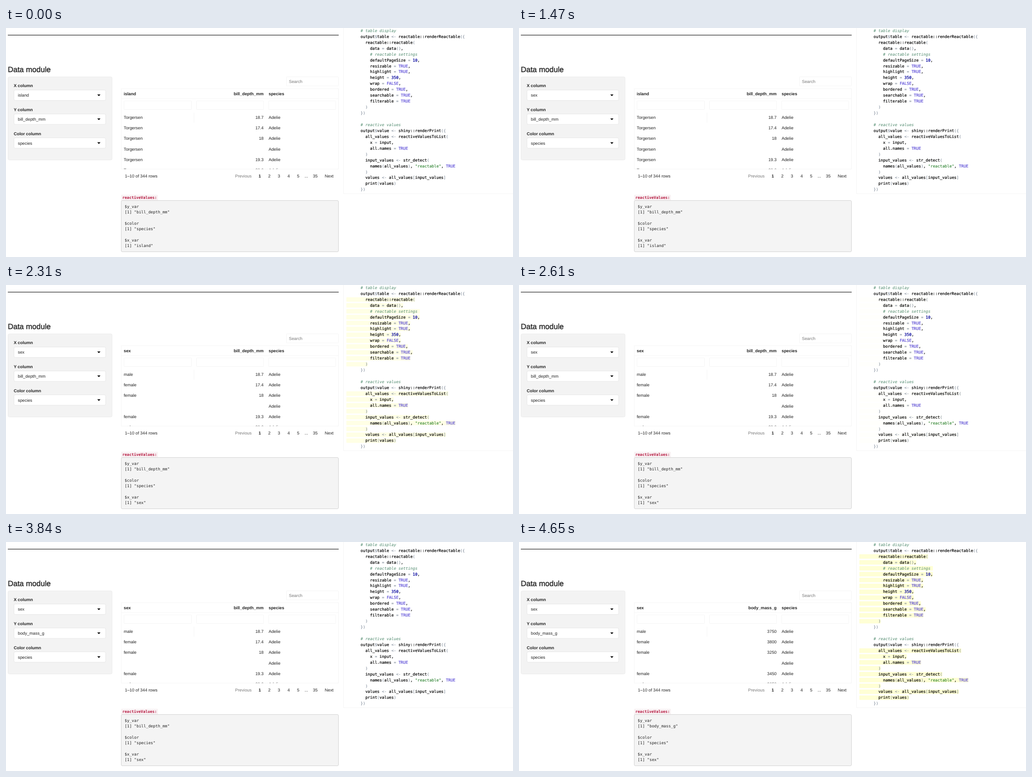
These frames come from a looping animation (1111x504 px, 4.68 s). An HTML page:

```html
<!DOCTYPE html>
<html lang="en">
<head>
<meta charset="utf-8">
<title>Data module</title>
<style>
  html, body { margin: 0; width: 100%; height: 100%; overflow: hidden; background: #fff; }
  svg { display: block; width: 1111px; height: 504px; }
  text {
    font-family: "Liberation Sans", Arial, sans-serif; font-size: 9.3px;
    fill: #222; white-space: pre; text-rendering: geometricPrecision;
  }
  .b { font-weight: bold; }
  .end { text-anchor: end; }
  .mid { text-anchor: middle; }
  .muted { fill: #777; }
  .title { font-size: 16.6px; fill: #2b2b2b; stroke: #2b2b2b; stroke-width: .5px; }
  .mono { font-family: "DejaVu Sans Mono", Menlo, monospace; font-size: 8.64px; }
  .code { fill: #000; stroke: #000; stroke-width: .22px; }
  .tag { font-size: 8.4px; font-weight: bold; fill: #b5183f; }
  .comment { fill: #4c886b; stroke: none; font-style: italic; }
  .string { fill: #036a07; stroke: none; }
  .literal { fill: #5848d6; stroke: #5848d6; }
  .number { fill: #1a1aa6; stroke: #1a1aa6; stroke-width: .4px; }
  .op { fill: #687687; stroke: none; }
  .well { fill: #f3f3f3; stroke: #ececec; }
  .pre { fill: #f4f4f4; stroke: #d2d2d2; }
  .line { fill: none; stroke: #f5f5f5; }
  .box { fill: #fff; stroke: #e6e6e6; }
  .open .box { stroke: #66afe9; filter: drop-shadow(0 0 2px rgba(102, 175, 233, .6)); }
  .menu { visibility: hidden; }
  .open .menu { visibility: visible; }
  .panel { fill: #fff; stroke: #d0d0d0; filter: drop-shadow(0 4px 4px rgba(0, 0, 0, .175)); }
  .bar { fill: #337ab7; }
  .menu .on { fill: #fff; }
  #glow { fill: #ff9; }
</style>
</head>
<body>
<svg id="stage" viewBox="0 0 1111 504"></svg>
<script>
const LOOP = 4680;
const COLUMNS = ["species", "island", "bill_length_mm", "bill_depth_mm",
                 "flipper_length_mm", "body_mass_g", "sex", "year"];
const DATA = {
  island: Array(6).fill("Torgersen"),
  sex: ["male", "female", "female", "", "female", "male"],
  bill_depth_mm: ["18.7", "17.4", "18", "", "19.3", "20.6"],
  body_mass_g: ["3750", "3800", "3250", "", "3450", "3650"],
  species: Array(6).fill("Adelie")
};
const CODE = `# table display
output$table <- reactable::renderReactable({
  reactable::reactable(
    data = data(),
    # reactable settings 
    defaultPageSize = 10,
    resizable = TRUE,
    highlight = TRUE,
    height = 350,
    wrap = FALSE,
    bordered = TRUE,
    searchable = TRUE,
    filterable = TRUE
  )
})

# reactive values
output$value <- shiny::renderPrint({
  all_values <- reactiveValuesToList(
    x = input,
    all.names = TRUE
  )
  input_values <- str_detect(
    names(all_values), "reactable", TRUE
  )
  values <- all_values[input_values]
  print(values)
})`.split("\n");

// Each pick: menu opens, pointer enters rows, value is taken, outputs refresh and glow.
const PICKS = [
  { menu: "x", from: "island", to: "sex", open: 60, close: 1170, update: 1500, fade: 1220,
    hover: [420, 480, 540, 600, 660, 810, 900] },
  { menu: "y", from: "bill_depth_mm", to: "body_mass_g", open: 2910, close: 3600, update: 3870, fade: 1400,
    hover: [3030, 3120, 3210, 3300, 3390, 3480] }
];

const CHAR = 5.2, LINE = 12.945, ROW = 23.27, OPTION = 17.3;
const $ = id => document.getElementById(id);
const esc = s => s.replace(/&/g, "&amp;").replace(/</g, "&lt;");
const rect = (x, y, w, h, cls, r = 0) =>
  `<rect x="${x}" y="${y}" width="${w}" height="${h}" rx="${r}" class="${cls}"/>`;
// y is the middle of the capitals
const raw = (x, y, html, cls = "", id = "", size = 9.3) =>
  `<text x="${x}" y="${y + size * .355}" class="${cls}"${id && ` id="${id}"`}>${html}</text>`;
const label = (x, y, s, cls, id, size) => raw(x, y, esc(s), cls, id, size);
const mono = (x, y, s, id) => label(x, y, s, "mono", id, 8.64);

function paint(line) {
  const kinds = ["comment", "string", "literal", "number", "op"];
  const token = /(#.*)|("[^"]*")|(\b(?:TRUE|FALSE)\b)|(\b\d+\b)|(<-|[=$(){}[\]])/g;
  let out = "", at = 0;
  for (const m of line.matchAll(token)) {
    const kind = kinds[m.slice(1).findIndex(Boolean)];
    out += esc(line.slice(at, m.index)) + `<tspan class="${kind}">${esc(m[0])}</tspan>`;
    at = m.index + m[0].length;
  }
  return out + esc(line.slice(at));
}

function codePanel() {
  let glow = "", text = "";
  CODE.forEach((line, i) => {
    const y = 5.8 + i * LINE;
    const indent = line.search(/\S|$/);
    if (indent) glow += rect(745.8, y - 4.7, (6 + line.length) * CHAR, 9.8, "", 1);
    text += raw(777 + indent * CHAR, y, paint(line.trimStart()), "mono code", "", 8.64);
  });
  return `<path class="line" d="M739.5 0V364.5H1111"/><g id="glow">${glow}</g>${text}`;
}

function select(id, y, title, value) {
  return label(17, y - 21, title, "b") + `<g id="${id}">` +
    rect(17.5, y - 11.5, 201, 23, "box", 3) +
    label(26, y, value, "", id + "Value") +
    `<path id="${id}Caret" d="M200 ${y - 1.8}h7l-3.5 3.8z"/></g>`;
}

function menu(id, y) {
  const top = y + 12;
  const rows = COLUMNS.map((c, i) => label(26, top + 3.3 + OPTION * (i + .5), c)).join("");
  return `<clipPath id="${id}Clip">${rect(18, top, 200, 133, "")}</clipPath>
    <g class="menu">${rect(17.5, top, 201, 134, "panel", 2)}
    <g clip-path="url(#${id}Clip)">${rect(18, top + 3.3, 200, OPTION, "bar")}${rows}</g></g>`;
}

function table() {
  let s = rect(614.5, 107.5, 114, 20, "line", 1) + label(620, 117.7, "Search", "muted") +
    rect(252.5, 133.5, 476, 177, "line") +
    `<path class="line" d="M253 155.5H728M412 186V208"/>` +
    rect(258.5, 160.5, 148, 19, "line", 1) + rect(417.5, 160.5, 147, 19, "line", 1) +
    rect(575.5, 160.5, 147, 19, "line", 1) +
    label(258, 145, "", "b", "headX") + label(564.5, 145, "", "b end", "headY") +
    label(575.5, 145, "species", "b") +
    `<clipPath id="body">${rect(252, 156, 477, 154.6, "")}</clipPath><g clip-path="url(#body)">`;
  DATA.species.forEach((name, i) => {
    const y = 196.6 + i * ROW;
    s += label(258, y, "", "", "cellX" + i) + label(564.5, y, "", "end", "cellY" + i) +
      label(575.5, y, name);
  });
  s += "</g>" + label(260.5, 325.3, "1–10 of 344 rows") + label(502, 325.3, "Previous", "muted");
  ["1", "2", "3", "4", "5"].forEach((n, i) => {
    s += label(556 + i * 21.1, 325.3, n, i ? "mid" : "mid b");
  });
  return s + label(658, 325.3, "...", "mid") + label(677.7, 325.3, "35", "mid") +
    label(698.5, 325.3, "Next");
}

function output() {
  return rect(252, 367, 81, 13, "", 2).replace("/>", ' fill="#f9f2f4"/>') +
    label(255, 373.5, "reactiveValues:", "mono tag", "", 8.4) +
    rect(252.5, 379.7, 476, 112.8, "pre", 2.5) +
    mono(260, 393, "$y_var") + mono(260, 405.3, "", "printY") +
    mono(260, 429.8, "$color") + mono(260, 442, '[1] "species"') +
    mono(260, 466.6, "$x_var") + mono(260, 479, "", "printX");
}

$("stage").innerHTML =
  `<path d="M4 15.6H729" stroke="#222" stroke-width="1.4"/>` +
  label(4, 91.4, "Data module", "title", "", 16.6) +
  rect(4.5, 107.5, 228, 183, "well", 3) +
  select("x", 148, "X column", "island") +
  select("y", 200.7, "Y column", "bill_depth_mm") +
  select("color", 253.2, "Color column", "species") +
  table() + output() + codePanel();

// Menus lie above everything else in the sidebar.
for (const [id, y] of [["x", 148], ["y", 200.7]]) {
  $("stage").insertAdjacentHTML("beforeend", `<g id="${id}Menu">${menu(id, y)}</g>`);
}

const put = (id, s) => { if ($(id).textContent !== s) $(id).textContent = s; };

function drawMenu(p, t) {
  const open = t >= p.open && t < p.close;
  const group = $(p.menu + "Menu");
  const entered = p.hover.filter(h => t >= h).length;
  const active = entered ? entered - 1 : COLUMNS.indexOf(p.from);
  $(p.menu).setAttribute("class", open ? "open" : "");
  group.setAttribute("class", open ? "open" : "");
  group.querySelector(".bar").setAttribute("transform", `translate(0 ${active * OPTION})`);
  group.querySelectorAll("text").forEach((el, i) => el.setAttribute("class", i === active ? "on" : ""));
  const cy = p.menu === "x" ? 148 : 200.7;
  $(p.menu + "Caret").setAttribute("transform", open ? `rotate(180 203.5 ${cy})` : "");
  put(p.menu + "Value", t < p.close ? p.from : p.to);
}

function drawOutput(p, t) {
  const key = p.menu.toUpperCase();
  const column = t < p.update ? p.from : p.to;
  put("head" + key, column);
  put("print" + key, `[1] "${column}"`);
  DATA[column].forEach((v, i) => put("cell" + key + i, v));
}

function glowAt(p, t) {
  const k = (t - p.update) / p.fade;
  return k < 0 || k > 1 ? 0 : .5 + .5 * Math.cos(Math.PI * k);
}

function draw(t) {
  for (const p of PICKS) {
    drawMenu(p, t);
    drawOutput(p, t);
  }
  $("glow").style.opacity = Math.max(...PICKS.map(p => glowAt(p, t)));
}

const start = performance.now();
function tick() {
  draw((performance.now() - start) % LOOP);
  requestAnimationFrame(tick);
}
draw(0);
requestAnimationFrame(tick);
</script>
</body>
</html>
```
